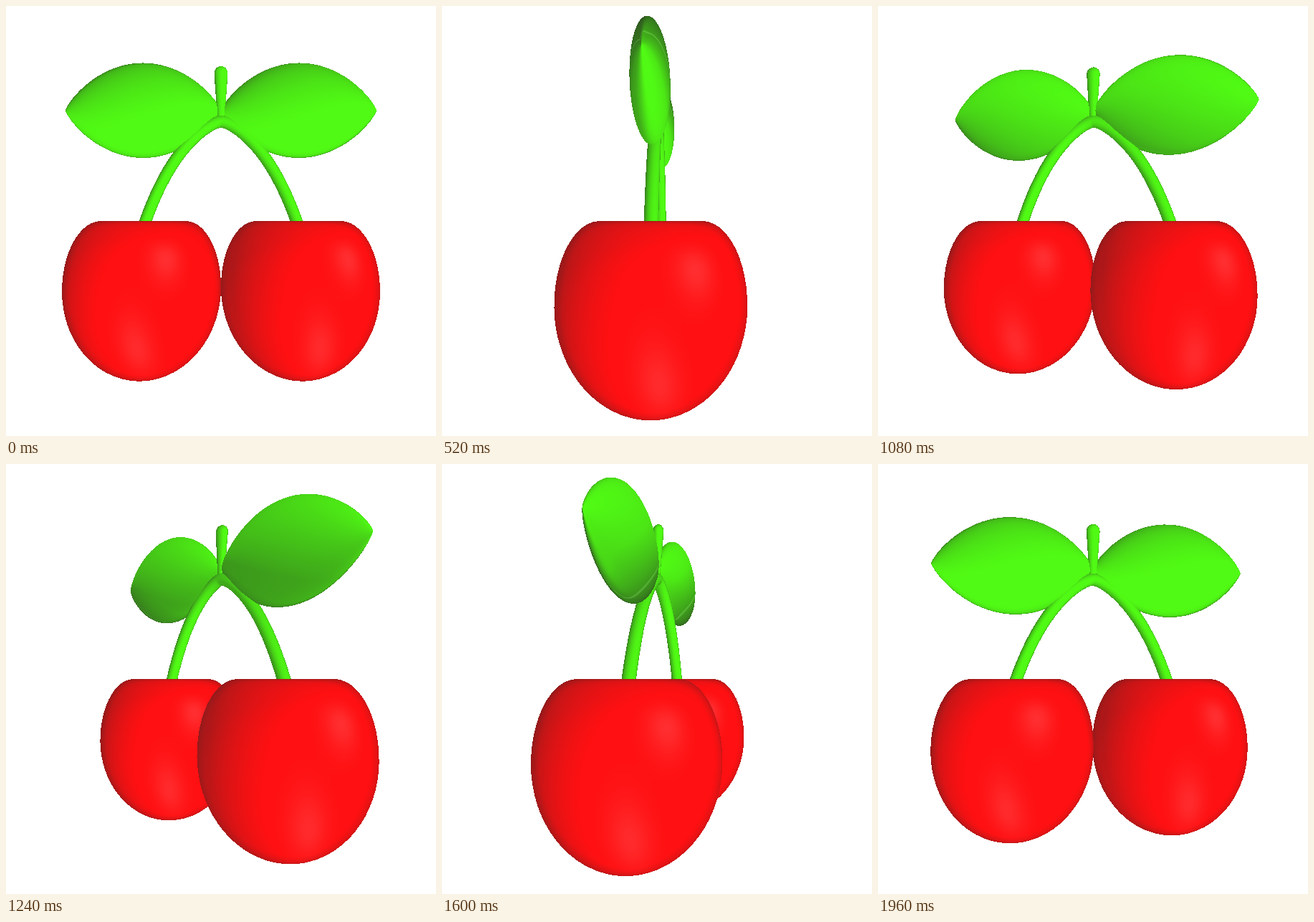
Write an HTML page with a canvas that moves like this. It is 600x600 px and loops after 2 s.

```html
<!DOCTYPE html>
<html lang="en">
<head>
<meta charset="utf-8">
<title>Cherries</title>
<style>
  html, body { margin: 0; width: 100%; height: 100%; overflow: hidden; background: #fff; }
  canvas { display: block; width: 600px; height: 600px; }
</style>
</head>
<body>
<canvas id="stage" width="600" height="600"></canvas>
<script>
// MID is half a pixel short so that pixels are sampled at their centres.
const SIZE = 600, MID = 299.5, EYE = 582, STEP = 40, STEPS = 50;
const { sin, cos, PI, min, max, pow, exp, abs, hypot, floor, ceil } = Math;
const ctx = document.getElementById('stage').getContext('2d');
const image = ctx.createImageData(SIZE, SIZE);
const pixels = image.data;
const depth = new Float32Array(SIZE * SIZE);

const RED = { rgb: [255, 16, 18], ambient: 0.63, glossy: true, skew: 0 };
const GREEN = { rgb: [80, 250, 20], ambient: 0.5, glossy: false, skew: 0 };
// Leaf normals lean sideways from the upper edge to the lower one.
const LEAF = { ...GREEN, skew: 0.5 };

// Surfaces: s runs along the part, a runs around it; y points down.
const cherry = side => (s, a) => {
  const top = s < 0.4;
  const q = (top ? s / 0.4 : (s - 0.4) / 0.6) * PI / 2;
  const r = top ? 58 + 49.3 * sin(q) : 107.3 * cos(q);
  const y = top ? 92 - 92 * cos(q) : 92 + 125 * sin(q);
  return [side * 107.2 + r * cos(a), y, r * sin(a)];
};

const leaf = side => (s, a) => {
  const f = pow(sin(PI * s), 1.6);
  return [side * 108.5 * (1 - cos(PI * s)), -154 + 66 * f * cos(a), 22 * f * sin(a)];
};

const stem = (s, a) => {
  const t = 2.2 * s - 1.1, u = abs(t), r = 8.4;
  const slope = 141 * (1.125 * pow(u, 0.5) + pow(u, 3)) * Math.sign(t);
  const len = hypot(106, slope);
  return [
    106 * t - r * cos(a) * slope / len,
    -139 + 141 * (0.75 * pow(u, 1.5) + 0.25 * pow(u, 4)) + r * cos(a) * 106 / len,
    r * sin(a)
  ];
};

const stub = (s, a) => {
  const cap = s > 0.7, q = (s - 0.7) / 0.3 * PI / 2;
  const r = cap ? 9.5 * cos(q) : 5 + 4.5 * s / 0.7;
  const y = cap ? -205.5 - 9.5 * sin(q) : -140 - 65.5 * s / 0.7;
  return [r * cos(a), y, 0.8 * r * sin(a) + 2.5 * s];
};

const sub = (p, q) => p.map((v, i) => v - q[i]);
const cross = (p, q) => [
  p[1] * q[2] - p[2] * q[1],
  p[2] * q[0] - p[0] * q[2],
  p[0] * q[1] - p[1] * q[0]
];

function makeMesh(fn, rows, cols, skin) {
  const e = 1e-4;
  const normalAt = (s, a) => {
    const n = cross(sub(fn(s + e, a), fn(s - e, a)), sub(fn(s, a + e), fn(s, a - e)));
    const len = hypot(...n) || 1;
    return n.map(v => v / len);
  };
  const out = sub(fn(0.45, 0), fn(0.45, PI));
  const n0 = normalAt(0.45, 0);
  const sign = n0[0] * out[0] + n0[1] * out[1] + n0[2] * out[2] < 0 ? -1 : 1;
  const verts = [], tris = [];
  for (let i = 0; i <= rows; i++) {
    const s = 0.003 + 0.994 * i / rows;
    for (let j = 0; j <= cols; j++) {
      const a = j / cols * 2 * PI;
      const n = normalAt(s, a).map(v => v * sign);
      n[0] += skin.skew * cos(a);
      verts.push({ p: fn(s, a), n });
      if (i < rows && j < cols) {
        const k = i * (cols + 1) + j, m = k + cols + 1;
        tris.push([k, k + 1, m], [k + 1, m + 1, m]);
      }
    }
  }
  return { verts, tris, skin };
}

const meshes = [
  makeMesh(cherry(-1), 32, 72, RED),
  makeMesh(cherry(1), 32, 72, RED),
  makeMesh(leaf(-1), 40, 48, LEAF),
  makeMesh(leaf(1), 40, 48, LEAF),
  makeMesh(stem, 49, 20, GREEN),
  makeMesh(stub, 20, 20, GREEN)
];

function shade(at, x, y, nx, ny, nz, skin) {
  const len = hypot(nx, ny, nz) || 1;
  nx /= len; ny /= len; nz /= len;
  const dx = x - MID, dy = y - MID;
  const facing = (EYE * nz - dx * nx - dy * ny) / hypot(dx, dy, EYE);
  const side = max(0, 0.5 * nx - 0.2 * ny + 0.84 * nz);
  const below = max(0, 0.1 * nx + 0.8 * ny + 0.55 * nz);
  let light = min(1, skin.ambient + 0.42 * side + 0.22 * below);
  light *= 0.75 + 0.25 * max(-1, min(1, facing * 2.5));
  let glow = 36 * (1 - light);
  if (skin.glossy) {
    glow += 30 * pow(max(0, 0.4 * nx - 0.3 * ny + 0.866 * nz), 60);
    glow += 26 * exp(-30 * pow(nx - 0.03 - 0.13 * ny, 2) - 12 * pow(ny - 0.4, 2));
  }
  if (skin.skew) glow += 30 * max(0, 1 - abs(facing) * 40);
  const o = at * 4;
  for (let i = 0; i < 3; i++) pixels[o + i] = skin.rgb[i] * light + glow;
}

function fillTriangle(A, B, C, skin) {
  const area = (B.x - A.x) * (C.y - A.y) - (B.y - A.y) * (C.x - A.x);
  if (abs(area) < 1e-6) return;
  const x0 = max(0, ceil(min(A.x, B.x, C.x))), x1 = min(SIZE - 1, floor(max(A.x, B.x, C.x)));
  const y0 = max(0, ceil(min(A.y, B.y, C.y))), y1 = min(SIZE - 1, floor(max(A.y, B.y, C.y)));
  for (let y = y0; y <= y1; y++) {
    for (let x = x0; x <= x1; x++) {
      const b = ((x - A.x) * (C.y - A.y) - (y - A.y) * (C.x - A.x)) / area;
      const c = ((B.x - A.x) * (y - A.y) - (B.y - A.y) * (x - A.x)) / area;
      const a = 1 - b - c;
      if (a < -1e-6 || b < -1e-6 || c < -1e-6) continue;
      const w = a * A.w + b * B.w + c * C.w, at = y * SIZE + x;
      if (w <= depth[at]) continue;
      depth[at] = w;
      shade(at, x, y,
        a * A.nx + b * B.nx + c * C.nx,
        a * A.ny + b * B.ny + c * C.ny,
        a * A.nz + b * B.nz + c * C.nz,
        skin);
    }
  }
}

function draw(angle) {
  const s = sin(angle), c = cos(angle);
  pixels.fill(255);
  depth.fill(0);
  for (const { verts, tris, skin } of meshes) {
    const pts = verts.map(({ p, n }) => {
      const w = EYE / (EYE - p[0] * s - p[2] * c);
      return {
        x: MID + (p[0] * c - p[2] * s) * w,
        y: MID + p[1] * w,
        w,
        nx: n[0] * c - n[2] * s,
        ny: n[1],
        nz: n[0] * s + n[2] * c
      };
    });
    for (const [i, j, k] of tris) fillTriangle(pts[i], pts[j], pts[k], skin);
  }
  ctx.putImageData(image, 0, 0);
}

const start = performance.now();
let shown = -1;
function tick() {
  const step = floor((performance.now() - start) / STEP) % STEPS;
  if (step !== shown) {
    shown = step;
    draw(step / STEPS * 2 * PI);
  }
  requestAnimationFrame(tick);
}
tick();
</script>
</body>
</html>
```
